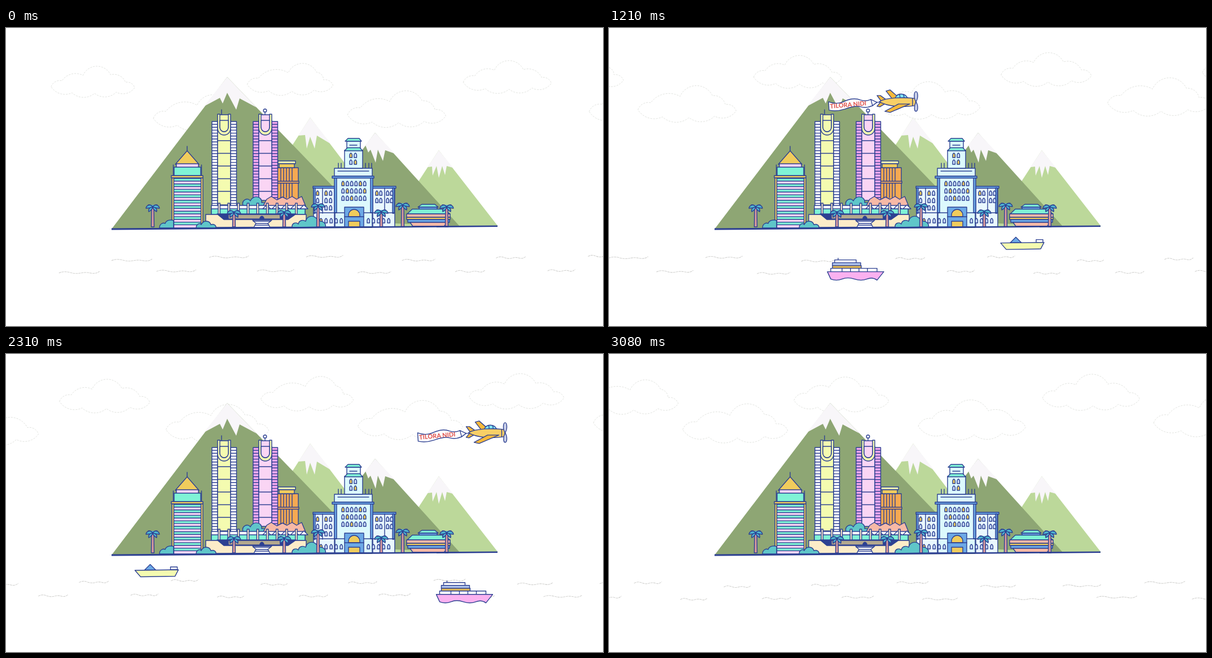
Write an HTML page that moves like this. It is 1058 px wide and 529 px high and loops after 3190 ms.

```html
<!DOCTYPE html>
<html lang="en">
<head>
<meta charset="utf-8">
<title>City by the water</title>
<style>
  html, body { margin: 0; width: 100%; height: 100%; overflow: hidden; background: #fff; }
  svg { display: block; width: 100vw; height: 100vh; }
  text { font: 700 11px Lato, "Open Sans", sans-serif; fill: #dc4a45; stroke: none; }
</style>
</head>
<body>
<svg id="stage" viewBox="0 0 1058 529" preserveAspectRatio="none"></svg>
<script>
const NAVY = '#2d4092', MINT = '#7ff3d6', PINK = '#fad5f4', YELLOW = '#f0cc5c', CREAM = '#fcecc8',
  LEMON = '#f4fbb0', ICE = '#dcf9fd', BLUE = '#6ca9e6', TEAL = '#5fc6c9', ORANGE = '#f5a952',
  CORAL = '#f7b9a6', GOLD = '#f6b93b', DARK = '#8ea674', LIGHT = '#bcd89a', SNOW = '#f8f6f9';

// ---- markup helpers
const P = (d, fill = 'none') => `<path d="${d}" fill="${fill}"/>`;
const R = (x, y, w, h, fill) => P(`M${x} ${y}h${w}v${h}h${-w}z`, fill);
const each = (list, fn) => list.map(fn).join('');
const times = (n, fn) => each([...Array(n).keys()], fn);
const series = (from, step, n) => Array.from({ length: n }, (_, i) => from + step * i);
const rows = (x, w, ys) => P(each(ys, y => `M${x} ${y}h${w}`));
const cols = (y, h, xs) => P(each(xs, x => `M${x} ${y}v${h}`));
const group = (id, body, more) => `<g id="${id}" ${more}>${body}</g>`;

// ---- sky and sea: uneven rows laid out from left to right
function cloud(i) {
  const odd = i % 2, w = 148 + 20 * odd + 2 * i, h = w * .36, top = .57 + .08 * Math.cos(i - 1.8);
  const x = 50 + 195 * i + 30 * Math.cos(i), y = odd ? 121 - 3.5 * i : 67 - 2.5 * i;
  const knots = [[0, .7], [.13, .5], [top - .17, .32], [top + .16, .3], [.89, .55], [1, .73],
    [.78, .88], [.52, .92], [.25, .9], [0, .7]].map(([u, v]) => [x + u * w, y + v * h]);
  return P('M' + knots[0] + each(knots.slice(1), ([px, py], k) => {
    const chord = Math.hypot(px - knots[k][0], py - knots[k][1]);
    const r = chord * (k === 2 ? .55 : .75);
    return `A${r} ${r} 0 0 1 ${px} ${py}`;
  }) + 'z');
}

function wave(x, y, i) {
  const w = 60 + 12 * Math.cos(i * .55);
  return P(`M${x} ${y}q${w * .12} -4 ${w * .27} -1t${w * .27} 1t${w * .24} 0t${w * .22} -3`);
}
const farWave = i => wave(187 + 159 * i + 50 * Math.sin(Math.PI * i / 11), 409 + 4 * Math.cos(2 * i), i);
const nearWave = i => wave(125 + 160 * i + 35 * Math.sin((i - 2) * .55), 433 + 2 * Math.cos(2 * i), i);

// ---- land
const mountains =
  P('M416 350L539 159L680 345z', LIGHT) + P('M679 352L767 217L872 352z', LIGHT) +
  P('M540 340L654 186L804 352z', DARK) + P('M187 357L392 87L578 280L650 355z', DARK) +
  P('M392 87L351 139L379 124L384 134L392 115L408 145L414 125L444 141z', SNOW) +
  P('M539 159L518 191L530 190L533 214L539 193L547 214L551 191L576 206z', SNOW) +
  P('M654 186L637 208L642 221L646 216L655 239L659 216L668 236L672 217L689 223z', SNOW) +
  P('M767 217L747 247L755 246L756 262L763 245L767 266L773 245L778 261L781 245L792 248z', SNOW);

const office = cols(210, 9, [321]) + cols(243, 20, [296.5, 346.5]) +
  P('M321 218L300 242H342z', YELLOW) + R(302, 241, 39, 7, PINK) + R(298, 247, 47, 15, MINT) +
  R(297, 266, 49, 89, PINK) + each(series(267, 9.7, 9), y => R(297, y, 49, 4.8, MINT)) +
  R(294, 266, 3.5, 89, YELLOW) + R(345.5, 266, 3.5, 89, YELLOW) + R(293, 262, 56, 4, YELLOW);

function tower(x, base, side, mid, inner) {
  const floors = series(171, 5.2, Math.floor((base - 168) / 5.2));
  return R(x, 166, 10, base - 166, side) + R(x + 33, 166, 10.5, base - 166, side) +
    R(x + 10, 164, 23, base - 166, mid) +
    rows(x, 10, floors) + rows(x + 33, 10.5, floors) + rows(x + 10, 23, series(200, 22.5, 5)) +
    R(x + 12, 154, 19, 12, inner) +
    P(`M${x + 10} 153V178a11.5 12 0 0 0 23 0V153h-4V176a7.5 8 0 0 1 -15 0V153z`, LEMON) +
    P(`M${x + 14} 164V176a7.5 8 0 0 0 15 0V164z`, inner);
}
const towers = R(481, 248, 37, 57, ORANGE) + R(482, 236, 31, 5, LEMON) + R(484, 241, 27, 7, YELLOW) +
  cols(249, 52, series(487, 5, 5)) + R(480, 272, 39, 3.5, ORANGE) +
  cols(145, 9, [382]) + tower(365, 316, '#fff', LEMON, LEMON) +
  cols(150, 4, [459]) + '<circle cx="459" cy="146.5" r="2.8" fill="#fff"/>' +
  tower(438, 308, '#f6a8ee', PINK, PINK);

const podium = P('M420 315c-3 -10 9 -15 13 -8c5 -12 22 -8 20 3c8 -1 10 4 9 8z', TEAL) +
  P('M455 317L462 304L470 299L480 305L490 300L498 304L507 299L515 304L524 299L531 316z', CORAL) +
  R(364, 315, 166, 16, '#fff') + R(364, 321, 166, 10, MINT) +
  each(series(455, 16.5, 5), x => P(`M${x} 321l7 -7l7 7z`, '#fff')) +
  each(series(376, 17.1, 9), x => R(x, 311, 3.4, 20, CREAM)) +
  P('M354 331H532V353L354 354z', CREAM) + P('M374 330H514L500 340H386z', NAVY) +
  R(394, 331, 92, 8, '#b4a88e') + P('M450 340v-3q3.5 -6 7 0v3z', NAVY) +
  P('M437 341H471L464 347L468 354H439L443 347z', '#fff') + P('M438 343H469M443 347H464M441 350H466');

// arched windows in a grid, every "lit"-th one glowing
const windows = (xs, ys, lit) => each(ys, (y, j) => each(xs, (x, i) =>
  P(`M${x} ${y + 8}v-5q2.2 -6 4.4 0v5z`, (i + j * 3) % lit ? '#cfe0fa' : YELLOW)));
const wing = (x, w) => R(x, 284, w, 69, '#e9f7fe') + R(x - 1, 281, w + 3, 3.5, BLUE);
const doorside = series(556, 9, 5).concat(series(640, 9, 5));
const hall = wing(545, 37) + wing(650, 39) +
  R(545, 284, 3, 45, BLUE) + R(685, 284, 3, 45, BLUE) + cols(284, 45, [561, 671]) +
  cols(240, 9, [589, 594, 637, 643, 648]) + R(582, 249, 67, 14, ICE) + rows(588, 55, [254]) +
  R(583, 266, 66, 87, ICE) + R(582, 266, 4, 62, BLUE) + R(646, 266, 4, 62, BLUE) +
  R(578, 263, 74, 3.5, BLUE) +
  R(600, 217, 32, 32, ICE) + R(604, 201, 24, 12, ICE) + rows(609, 13, [208]) +
  P('M601 201L606 196H626L630 201z', MINT) + P('M600 218L605 212.5H627L632 218z', MINT) +
  windows([609, 617], [222, 234], 4) + windows(series(595, 7.7, 6), [272, 285, 298], 4) +
  windows([550], [289, 302], 2) + windows([565, 573], [289, 302, 315], 9) +
  windows([655, 662, 674, 681], [289, 302], 9) + rows(545, 143, [328]) + windows(doorside, [338], 99) +
  R(600, 318, 34, 35, BLUE) + P('M607 335v-3a10 10 0 0 1 20 0v3z', YELLOW) +
  R(607, 343, 20, 10, YELLOW) + rows(600, 34, [335]);

const pavilion = P('M730 318L737 313H760L766 318z', MINT) + R(732, 318, 32, 4, BLUE) +
  P('M711 330L720 321.5H775L787 330z', MINT) + R(710, 330, 77, 6, CORAL) + R(710, 336, 77, 4, YELLOW) +
  R(712, 340, 74, 5, BLUE) + P('M716 345H783L776 352H721z', CORAL);

const leaves = a => P(`M0 0C${3 * a} -6 ${11 * a} -4 ${12 * a} 2C${8 * a} 1 ${4 * a} 2 0 0z`, '#4fb9d2') +
  P(`M0 0C${6 * a} 0 ${8 * a} 4 ${7 * a} 8C${3 * a} 6 ${a} 4 0 0z`, '#4fb9d2');
const palm = ([x, y]) => P(`M${x - 2} ${y}L${x - 2.5} 353h5L${x + 2} ${y}z`, '#d99a9d') +
  `<g transform="translate(${x} ${y})">${leaves(1)}${leaves(-1)}${P('M-8 -4Q-2 -5 0 0Q2 -5 8 -4', '#4fb9d2')}</g>`;
const palms = [[260, 318], [404, 328], [493, 328], [553, 316], [665, 327], [703, 315], [781, 318]];
const bushes = P('M272 355c0 -8 7 -10 10 -8c2 -7 12 -7 15 -5V355z', TEAL) +
  P('M337 355c0 -8 7 -9 9 -6c4 -9 15 -7 17 0c6 -2 10 2 9 6z', TEAL) +
  P('M507 354c-1 -8 7 -10 11 -6c1 -7 9 -8 13 -5c2 -12 21 -12 21 1c8 -4 16 3 14 9z', TEAL);

// ---- moving craft
const boat = P('M17 10L27 0L37 10z', BLUE) + R(63, 4.5, 12, 5, '#fff') + P('M0 10.5L77 9.5L71 21L10 22z', LEMON);
const ship = P('M19 -20v-4') + R(13, -21, 38, 5, '#fff') + R(9, -16, 50, 5, '#afc4ec') + R(9, -11, 51, 5, '#d8b35a') +
  R(6, -6, 82, 6, '#fff') + cols(-6, 6, series(26, 15, 4)) +
  P('M0 0H100L88 15Q80 9 70 13T48 13T26 13T6 13z', '#fbb1f0');
const plane =
  P('M0 0Q14 6 29 -1T57 -3Q66 0 75 -4L78 7Q66 12 57 9T29 13Q14 18 1 15z', '#fff') +
  P('M75 -4L86 1L78 7M86 1h5') +
  '<text transform="translate(3 12) rotate(-5)">TILORA NIDI</text>' +
  P('M86 -11L92 -11L103 -3L94 0z', GOLD) + P('M92 1L86 8L91 9L101 3z', GOLD) +
  P('M102 -19L109 -21L125 -7L113 -5z', GOLD) +
  P('M118 -6C121 -16 135 -16 140 -7z', '#7fe3f3') + P('M126 -13l1 7M133 -13l1 6') +
  P('M90 0C102 -8 132 -8 153 -6Q157 0 153 7C132 10 105 9 90 0z', '#f8cf66') +
  P('M124 4L144 4L109 19L100 17z', GOLD) + cols(-6, 13, [149]) +
  P('M155 0C150 -8 152 -18 155 -18S160 -8 155 0C160 8 158 17 155 17S151 8 155 0z', '#cdd3ea');

const stage = document.getElementById('stage');
const ink = `stroke="${NAVY}" stroke-width="1.4" stroke-linejoin="round" stroke-linecap="round"`;
stage.innerHTML =
  group('clouds', times(14, cloud), 'stroke="#d3d6d0" stroke-width=".7" stroke-dasharray="3 2"') +
  mountains +
  `<g ${ink}>${office}${towers}${podium}${hall}${pavilion}${bushes}${each(palms, palm)}</g>` +
  P('M187 355.5L871 350.5V353L187 358.5z', NAVY) +
  group('waves', times(12, farWave) + times(13, nearWave), 'stroke="#d2d2d0" stroke-width="1.1" stroke-dasharray="4 1"') +
  group('boat', boat, ink) + group('ship', ship, ink) + group('plane', plane, ink);

// ---- motion in steps of 110 ms: keyed x, a simple curve for y
const STEP = 110, LOOP = 3190, TURN = 2 * Math.PI;
const keys = [0, 7, 11, 15, 18, 24, 28];
const moves = {
  clouds: { x: [0, -392, -554, -777, -971, -1337, -1647], y: k => -10 * Math.sin(TURN * k / 60) },
  waves: { x: [0, -252, -361, -491, -619, -859, -987], y: k => 3 * Math.sin(TURN * k / 26) },
  boat: { x: [1064, 811, 694, 547, 344, 113, -82], y: k => 371 + .04 * (k - 13) ** 2 },
  ship: { x: [-106, 256, 387, 516, 654, 871, 1064], y: k => 439 - .58 * k },
  plane: { x: [-164, 223, 389, 534, 632, 827, 1064], y: k => 121 + .9 * k + 11 * Math.max(0, 11 - k) }
};

function at(k, values) {
  const i = Math.max(1, keys.findIndex(key => key >= k));
  const u = (k - keys[i - 1]) / (keys[i] - keys[i - 1]);
  return values[i - 1] + (values[i] - values[i - 1]) * u;
}

const start = performance.now();
function draw(now) {
  const k = Math.floor(Math.max(0, now - start) % LOOP / STEP);
  for (const id in moves) {
    const { x, y } = moves[id];
    document.getElementById(id).setAttribute('transform', `translate(${at(k, x)} ${y(k)})`);
  }
  document.getElementById('clouds').setAttribute('fill', `rgb(249 251 ${247 - Math.round(10 * Math.sin(TURN * k / 64))})`);
  requestAnimationFrame(draw);
}
draw(start);
</script>
</body>
</html>
```
